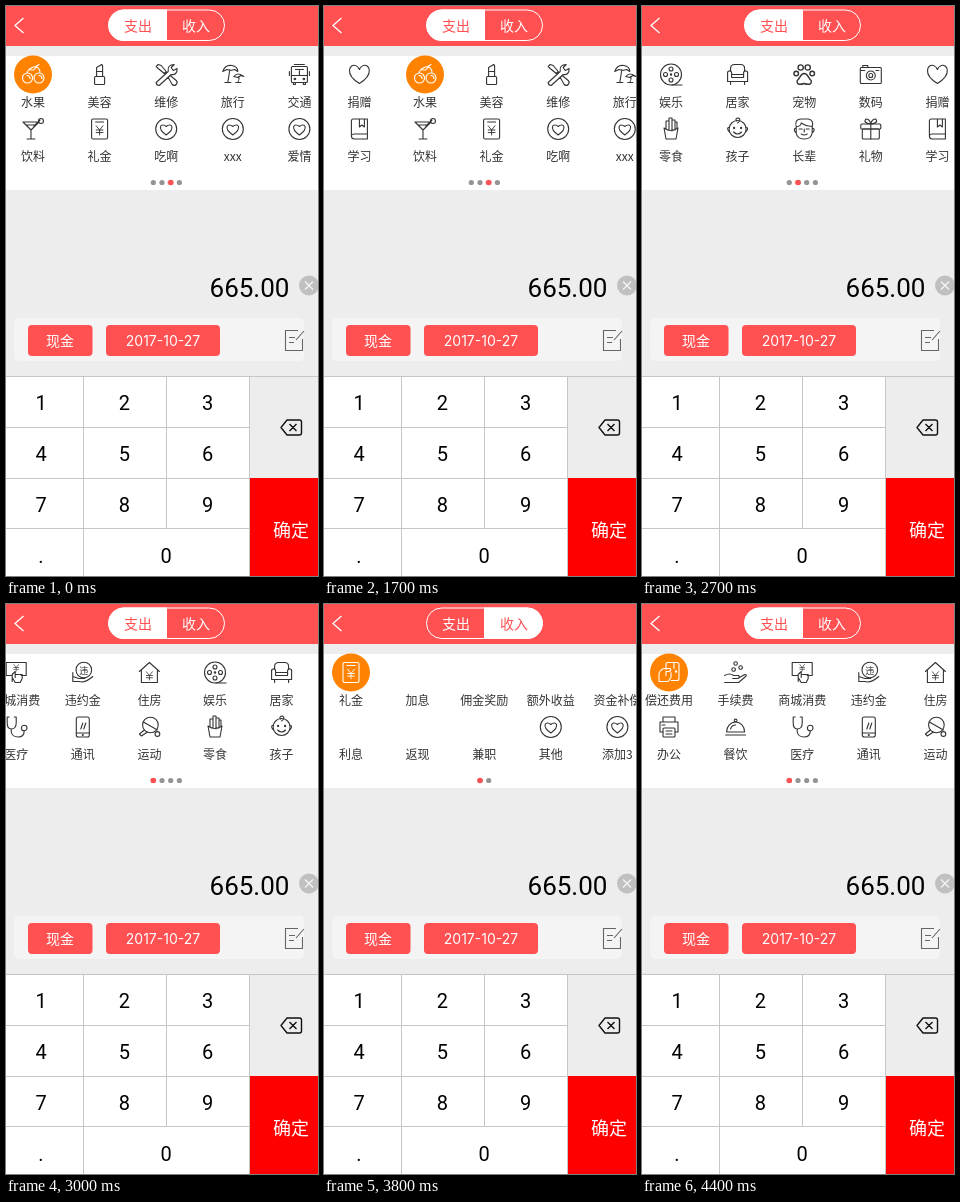
Animation of 312 by 570 pixels, one loop 8 s. Source, as an HTML page:

```html
<!DOCTYPE html>
<html lang="zh-CN">
<head>
<meta charset="utf-8">
<style>
  html, body { margin: 0; width: 100%; height: 100%; overflow: hidden; background: #ededed; }
  svg { display: block; width: 312px; height: 570px; }
  text { font-family: "Noto Sans CJK SC", "Noto Sans CJK JP", "Noto Sans CJK", sans-serif; text-anchor: middle; fill: #333; stroke: none; }
  .label { font-size: 12px; }
  .icon { fill: none; stroke: #333; stroke-width: 1.1; stroke-linecap: round; stroke-linejoin: round; }
  .picked .icon { stroke: #fff; }
  .icon text { font-size: 9px; }
  .tab { font-size: 14px; fill: #fff; }
  .key, .amount { font-family: Roboto, sans-serif; font-size: 20px; fill: #000; }
  .amount { font-size: 26px; }
  .date { font-family: Inter, sans-serif; font-size: 14px; fill: #fff; }
  .anim, .anim * { animation: 8s step-end infinite; }

  #strip { animation-name: swipe; }
  #marker { animation-name: marker; }
  #expense, #tabLeft { animation-name: expense; }
  #income, #tabRight { animation-name: income; }
  #repaid { animation-name: repaid; }
  .load1 { animation-name: load1 !important; }
  .load2 { animation-name: load2 !important; }
  .load3 { animation-name: load3 !important; }

  @keyframes swipe {
    0% { transform: translateX(-664px); }
    18.75% { transform: translateX(-659px); }
    21.25% { transform: translateX(-590px); }
    22.5% { transform: translateX(-400px); }
    23.75% { transform: translateX(-332px); }
    33.75% { transform: translateX(-330px); }
    36.25% { transform: translateX(-285px); }
    37.5% { transform: translateX(-150px); }
    38.75% { transform: translateX(-35px); }
    40%, 100% { transform: translateX(0); }
  }
  @keyframes marker {
    0% { transform: translateX(17.4px); }
    22.5% { transform: translateX(8.7px); }
    37.5%, 100% { transform: translateX(0); }
  }
  @keyframes expense { 0%, 55% { visibility: visible; } 47.5% { visibility: hidden; } 100% { visibility: visible; } }
  @keyframes income { 0%, 55% { visibility: hidden; } 47.5% { visibility: visible; } 100% { visibility: hidden; } }
  @keyframes repaid { 0% { opacity: 0; } 55%, 100% { opacity: 1; } }
  @keyframes load1 { 0% { opacity: 0; } 48.75%, 100% { opacity: 1; } }
  @keyframes load2 { 0% { opacity: 0; } 50%, 100% { opacity: 1; } }
  @keyframes load3 { 0% { opacity: 0; } 51.25%, 100% { opacity: 1; } }
</style>
</head>
<body>
<svg viewBox="0 0 312 570">
  <rect width="312" height="570" fill="#ededed"/>
  <rect y="50" width="312" height="134" fill="#fff"/>

  <g class="anim">
    <g id="expense">
      <g id="strip"></g>
      <g id="dots4"></g>
      <circle id="marker" cx="147.3" cy="176.5" r="2.8" fill="#ff5052"/>
    </g>
    <g id="income"></g>
  </g>

  <rect width="312" height="40" fill="#ff5052"/>
  <path d="M17.5 12L9 19.500 17.500 27" fill="none" stroke="#fff" stroke-width="1.3"/>
  <rect x="102.5" y="4" width="116" height="30.5" rx="15.2" fill="none" stroke="#fff"/>
  <text class="tab" x="132" y="25">支出</text>
  <text class="tab" x="190" y="25">收入</text>
  <g class="anim">
    <g id="tabLeft">
      <path d="M161 3.500H118a15.700 15.700 0 0 0 0 31.500H161z" fill="#fff"/>
      <text class="tab" x="132" y="25" style="fill:#ff5052">支出</text>
    </g>
    <g id="tabRight">
      <path d="M160 3.500H203a15.700 15.700 0 0 1 0 31.500H160z" fill="#fff"/>
      <text class="tab" x="190" y="25" style="fill:#ff5052">收入</text>
    </g>
  </g>

  <text class="amount" x="243.5" y="291">665.00</text>
  <circle cx="303" cy="279.5" r="10" fill="#c0c0c0"/>
  <path d="M299 275.500l8 8m0-8l-8 8" stroke="#f4f4f4" stroke-width="1.4"/>

  <rect x="8" y="312" width="290" height="43" rx="5" fill="#f4f4f4"/>
  <rect x="22" y="319" width="64.5" height="31" rx="4" fill="#ff5052"/>
  <rect x="100" y="319" width="114" height="31" rx="4" fill="#ff5052"/>
  <text class="tab" x="54" y="340">现金</text>
  <text class="date" x="157" y="340">2017-10-27</text>
  <path d="M292 324.500H279.500V344.500H296.500V333M283 331.500h6M283 336.500h5M290 334l8-9" fill="none" stroke="#666" stroke-width="1.1"/>

  <rect y="370" width="243" height="200" fill="#fff"/>
  <path d="M0 370.500H312M0 421.500H243M0 472.500H243M0 522.500H243M77.500 370V570M160.500 370V522M243.500 370V570" fill="none" stroke="#c6c6c4"/>
  <rect x="244" y="472" width="68" height="98" fill="#f00"/>
  <g id="keys"></g>
  <path d="M281 414H293.500Q295.500 414 295.500 416V427Q295.500 429 293.500 429H281L275 421.500zM283.500 418l7 7m0-7l-7 7" fill="none" stroke="#111" stroke-width="1.4" stroke-linejoin="round"/>
  <text x="285" y="530.5" style="font-size:18px;fill:#fff">确定</text>
</svg>
<script>
const $ = id => document.getElementById(id);
const path = d => `<path d="${d}"/>`;
const ring = (x, y, r) => `<circle cx="${x}" cy="${y}" r="${r}"/>`;
const box = (x, y, w, h, r = 1) => `<rect x="${x}" y="${y}" width="${w}" height="${h}" rx="${r}"/>`;
const yen = (x, y, s) => `<g transform="translate(${x} ${y}) scale(${s})">${path('M-4-5L0 0 4-5M0 0V6M-4 0H4M-4 3H4')}</g>`;
const hand = path('M-11 3Q-6 0-2 3H3Q5 5 2 6H-3M4 5L9 2Q12 2 10 4L3 10H-11');

const icons = {
  cherry: ring(-5.5, 3.5, 5) + ring(6, 3.5, 5) + path('M-6-2Q-4-7 3-8Q7-6 7-2M-4-5Q2-3 3-8M3-8L6-10M-6 1Q-3 1-3 4M6 1Q9 1 9 4'),
  lipstick: box(-5, 2, 10, 8) + path('M-3 2V-7L2-10 3-9V2M-3-3H3'),
  tools: path('M-10-8l2-2 3 1 5 6-2 2-6-5zM2 3l2-2 6 5a2.500 2.500 0 0 1-4 4zM-10 8L2-3Q1-10 8-10L5-7l2 3 4-2Q11 1 5 0L-7 11Q-10 11-10 8'),
  palm: path('M-10-3Q-8-10-1-9Q5-8 5-3L2-5-2-4-6-5zM-3-5Q-4 2-5 8M1 2Q5-3 11 2L8 1 5 3zM6 2Q7 5 5 8M-8 8H-2M3 8H8'),
  bus: box(-8, -8, 16, 16, 1) + path('M-8 1H8M-6 8v2h2v-2M4 8v2h2v-2M-4-5H4M-10-3v4M10-3v4M-5-10H5M0-4V1') + ring(-4.5, 4.5, .8) + ring(4.5, 4.5, .8),
  cocktail: path('M-10-7H6L-2 1zM-2 1V10M-6 10H2M1-3L7-9M-7-4H3') + ring(8, -8, 2.5),
  packet: box(-8, -10, 16, 20, 1.5) + path('M-4-7H4') + yen(0, 1, .85),
  like: ring(0, 0, 10.5) + path('M0 6C-10-1-5-7 0-2.500C5-7 10-1 0 6z'),
  reel: ring(0, 0, 10.5) + ring(0, -5.5, 2) + ring(0, 5.5, 2) + ring(-5.5, 0, 2) + ring(5.5, 0, 2) + ring(0, 0, .7) + path('M1 10.500H11'),
  chair: path('M-7-3V-6Q-7-10-3-10H3Q7-10 7-6V-3M-10 2V-1a2 2 0 0 1 4-1V3H6V-2a2 2 0 0 1 4 1V7H-10zM-7 7v3M7 7v3M-6 0H6'),
  paw: `<g stroke-width="1.4">${ring(-8, -1, 2.3) + ring(-3.5, -7, 2.6) + ring(3.5, -7, 2.6) + ring(8, -1, 2.3)}${path('M0-1C4-1 4 4 7 6C8 11 3 10 0 9C-3 10-8 11-7 6C-4 4-4-1 0-1z')}</g>`,
  camera: box(-10.5, -7, 21, 16) + ring(0, 1, 4.5) + ring(0, 1, 2) + path('M-8-7v-2h5v2M5-4h3M-10-4h4'),
  heart: path('M0 9C-16-1-9-11-4-9Q-1-8 0-5Q1-8 4-9C9-11 16-1 0 9z'),
  fries: path('M-7-1L-5 10H5L7-1Q0 4-7-1M-5 0V-8h3V1M-2-6V-11H1V2M1-9H4V1M4-7H6V-1'),
  baby: ring(0, 0, 8.5) + path('M-8-2Q-12-1-8 3M8-2Q12-1 8 3M-1-8Q-3-11 1-11Q4-9 0-6M-4 3Q0 7 4 3') + ring(-3.5, -1, .6) + ring(3.5, -1, .6),
  elder: path('M-8-2Q-10-10-3-10H4Q10-9 8-2V4Q7 10 0 10Q-7 10-8 4zM-8-2Q-3-3-3-6Q3-2 8-3M-8-1Q-12 0-8 4M8-1Q12 0 8 4M-5 0h3M2 0h3M-3 5Q0 7 3 5M0 0v3'),
  gift: box(-10, -5, 20, 5) + box(-8.5, 0, 17, 10) + path('M0-5V10M0-5Q-8-6-5-10Q-1-10 0-5Q1-10 5-10Q8-6 0-5'),
  book: path('M-6-10H8V10H-5Q-8 10-8 7V-8Q-8-10-6-10M-8 7Q-8 5-5 5H8M0-10V-2L2.500-4 5-2V-10'),
  repay: path('M-3-3V-8Q-3-10-1-10H8Q10-10 10-8V6Q10 8 8 8H2M-10 9V1Q-8-4-4-4L1-4Q3-2 0-1H-3V3M-10 9H-1L2 5V0M5-10V-4') + ring(7, -1, .7),
  coins: ring(0, -9, 1.8) + ring(5, -5, 1.8) + ring(-2, -3, 1.8) + hand,
  card: path('M-4 3H-10V-10H10V3H5M-4 9V2L-1-1V5M-4 5L-1 10H4L6 6V2H-1') + yen(0, -5, .6),
  fine: ring(1, -2.5, 7.8) + '<text x="1" y="1">违</text>' + path('M-10 0V9H-4Q2 11 10 4M-10 4L-4 6H2'),
  house: path('M-10-1L0-10 10-1M-8-2V10H8V-2') + yen(0, 3, .75),
  printer: path('M-6-5V-10H6V-5M-6 5H-9V-5H9V5H6M-7-2H-4') + box(-6, 1, 12, 9) + path('M-3 4H3M-3 7H3'),
  cloche: path('M-9 5A9 10 0 0 1 9 5zM-10 8H10M-5 2Q-4-2 0-2') + ring(0, -6.5, 1.4),
  scope: path('M-7-10H-9V-4Q-9 2-5 2Q0 2 0-4V-10H-2M-5 2V5Q-4 10 2 10Q8 10 8 4') + ring(8, 1, 2.8),
  phone: box(-6.5, -10, 13, 20, 2) + path('M-6.500 6H6.500M-2 2L0-4M1 2L3-4') + ring(0, 8, .5),
  racket: ring(1, -2, 7.8) + path('M-5 3L-10 7-8 9-2 5M-6-5L8 3') + ring(8, 7, 2.4),
  percent: ring(0, 0, 10) + ring(-3.5, -3, 1.8) + ring(3.5, 3, 1.8) + path('M4-5L-4 5'),
  bag: path('M-4-6L-6-10H6L4-6zQ-10 2-8 8Q0 12 8 8Q10 2 4-6') + yen(0, 2, .7)
};

const pages = [
  '偿还费用 repay,手续费 coins,商城消费 card,违约金 fine,住房 house,办公 printer,餐饮 cloche,医疗 scope,通讯 phone,运动 racket',
  '娱乐 reel,居家 chair,宠物 paw,数码 camera,捐赠 heart,零食 fries,孩子 baby,长辈 elder,礼物 gift,学习 book',
  '水果 cherry,美容 lipstick,维修 tools,旅行 palm,交通 bus,饮料 cocktail,礼金 packet,吃啊 like,xxx like,爱情 like'
];
const incomePage = '礼金 packet,加息 percent,佣金奖励 bag,额外收益 coins,资金补偿 house,利息 percent,返现 card,兼职 bag,其他 like,添加3 like';
const loadOrder = [0, 1, 1, 2, 2, 3, 3, 3, 0, 0];

const drawIcon = (name, x, y) => `<g class="icon" transform="translate(${x} ${y})">${icons[name]}</g>`;
const picked = (name, id = '') => `<g class="picked" id="${id}"><circle cx="27" cy="68.5" r="19" fill="#ff8200"/>${drawIcon(name, 27, 68.5)}</g>`;
const grid = (page, loads) => page.split(',').map((item, i) => {
  const [label, name] = item.split(' ');
  const x = 27 + 66.6 * (i % 5), row = i < 5 ? 0 : 1;
  const icon = drawIcon(name, x, 68.5 + 54.5 * row);
  return (loads && loads[i] ? `<g class="load${loads[i]}">${icon}</g>` : icon) +
    `<text class="label" x="${x}" y="${101 + 54 * row}">${label}</text>`;
}).join('');
const dots = (n, x) => Array.from({ length: n }, (_, i) =>
  `<circle cx="${x + 8.7 * i}" cy="176.5" r="2.6" fill="#949494"/>`).join('');

$('strip').innerHTML = pages.map((page, i) =>
  `<g transform="translate(${332 * i} 0)">${grid(page)}${['', '', picked('cherry')][i]}</g>`).join('') + picked('repay', 'repaid');
$('dots4').innerHTML = dots(4, 147.3);
$('income').innerHTML = grid(incomePage, loadOrder) + picked('packet') + dots(2, 156) +
  '<circle cx="156" cy="176.5" r="2.8" fill="#ff5052"/>';
$('keys').innerHTML = [...'123456789'].map((n, i) =>
  `<text class="key" x="${35 + 83.3 * (i % 3)}" y="${404 + 51 * Math.floor(i / 3)}">${n}</text>`).join('') +
  '<text class="key" x="35" y="557">.</text><text class="key" x="160" y="557">0</text>';
</script>
</body>
</html>
```
